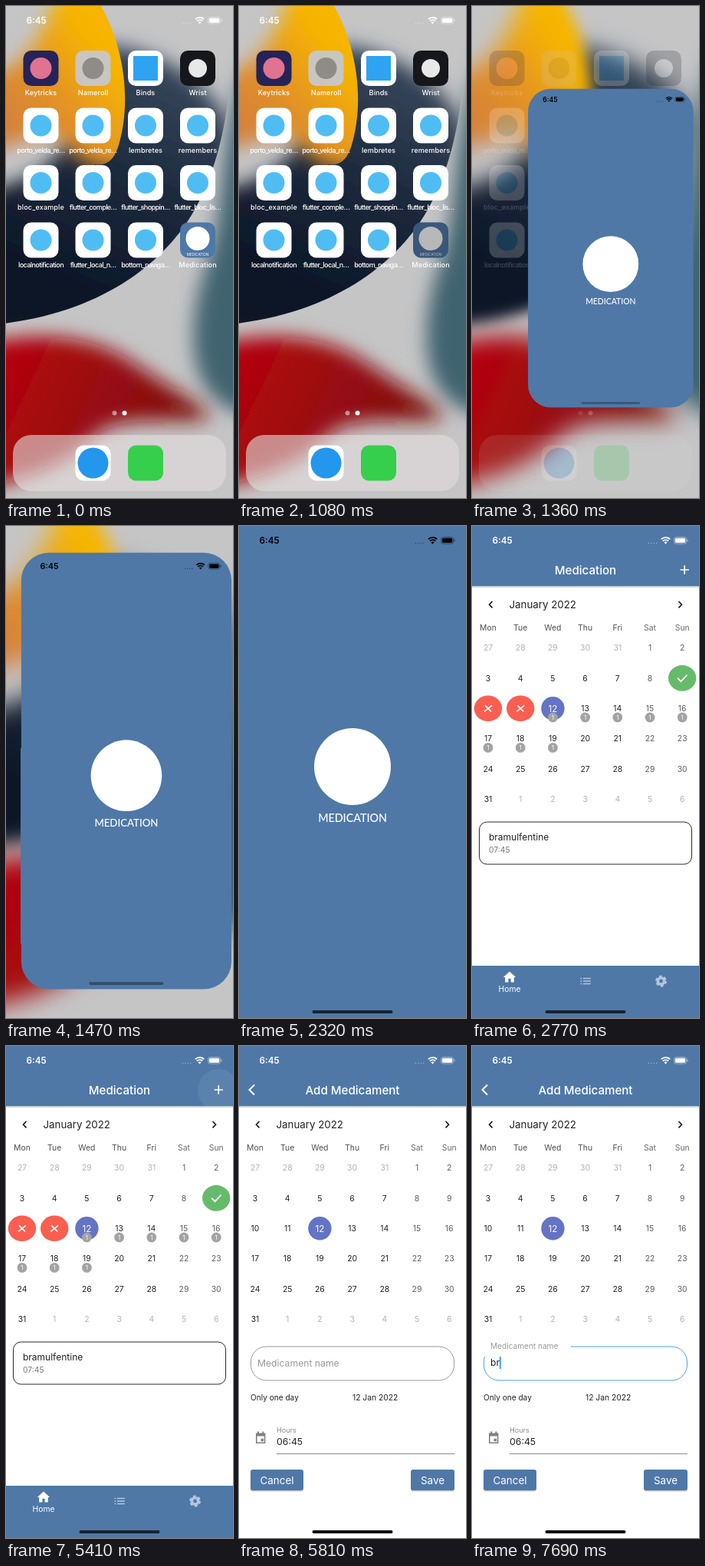
These frames come from a looping animation (296 px wide and 640 px high, 8000 ms). An HTML page:

```html
<!DOCTYPE html>
<html lang="en">
<head>
<meta charset="utf-8">
<title>Medication reminder</title>
<style>
  html, body { margin: 0; width: 100%; height: 100%; overflow: hidden; background: #fff; }
  svg { display: block; width: 296px; height: 640px; font-family: Inter, Roboto, sans-serif; }
  .mid { text-anchor: middle; }
</style>
</head>
<body>
<svg id="stage" viewBox="0 0 296 640" xmlns="http://www.w3.org/2000/svg"></svg>
<script>
const LOOP = 8000;
// Moments at which the picture is refreshed
const TICKS = [0, 1080, 1250, 1360, 1470, 1570, 1680, 2320, 2450, 2560, 2660, 2770,
  5410, 5580, 5695, 5810, 6790, 6890, 7360, 7470, 7580, 7690];
const BLUE = '#4f78a7';

const text = (x, y, size, fill, str, extra = '') =>
  `<text x="${x}" y="${y}" font-size="${size}" fill="${fill}" ${extra}>${str}</text>`;
const mid = (x, y, size, fill, str, extra = '') => text(x, y, size, fill, str, 'class="mid" ' + extra);
const rect = (x, y, w, h, fill, r = 0, extra = '') =>
  `<rect x="${x}" y="${y}" width="${w}" height="${h}" rx="${r}" fill="${fill}" ${extra}/>`;
const disc = (x, y, r, fill, extra = '') => `<circle cx="${x}" cy="${y}" r="${r}" fill="${fill}" ${extra}/>`;
const line = (d, color, w, extra = '') =>
  `<path d="${d}" fill="none" stroke="${color}" stroke-width="${w}" ${extra}/>`;

function statusBar(color) {
  let s = text(26.5, 23, 11.7, color, '6:45', 'font-weight="600"');
  for (let i = 0; i < 4; i++) s += disc(230.5 + i * 3.4, 22.3, 0.8, color, 'opacity=".4"');
  s += line('M246.8 17.2a8.2 8.2 0 0 1 11.4 0M248.9 19.5a5.2 5.2 0 0 1 7.2 0', color, 1.8);
  s += `<path d="M252.5 23.4l-2-2.1a2.9 2.9 0 0 1 4 0z" fill="${color}"/>`;
  s += rect(263.5, 14.5, 16, 8.6, 'none', 2.6, `stroke="${color}" stroke-opacity=".4"`);
  s += rect(264.8, 15.8, 13.4, 6, color, 1.5);
  return s + rect(280.4, 17.2, 1.2, 3.2, color, 0.6, 'opacity=".5"');
}

function wallpaper() {
  return `<defs>
    <filter id="soft" x="-40%" y="-40%" width="180%" height="180%"><feGaussianBlur stdDeviation="12"/></filter>
    <linearGradient id="sun" x1=".15" y1=".9" x2=".75" y2=".35"><stop stop-color="#cf7a45"/><stop offset=".5" stop-color="#e08f28"/><stop offset=".95" stop-color="#f7b500"/></linearGradient>
    <linearGradient id="night" x1=".3" y1="1" x2=".7" y2="0"><stop offset=".2" stop-color="#0b1626"/><stop offset=".6" stop-color="#1d2a3d"/><stop offset="1" stop-color="#3a4a5e"/></linearGradient>
    <linearGradient id="ruby" x2="1" y2=".3"><stop offset=".2" stop-color="#b4040f"/><stop offset=".65" stop-color="#960c12"/><stop offset="1" stop-color="#7d1410"/></linearGradient>
    <clipPath id="nightEdge"><path d="M-60 417C110 414 205 338 246 265C272 218 288 160 292 90V-20H-60Z"/></clipPath>
    <clipPath id="sunEdge"><path d="M-80-60H95L124 0C157 60 163 130 146 184Q137 210 116 206L90 250H-80Z"/></clipPath>
  </defs>
  ${rect(-80, -80, 456, 800, '#c5c5c6')}
  <path filter="url(#soft)" fill="#3f6470"
    d="M340 40C278 100 290 240 266 325C238 395 238 465 262 498C280 522 300 532 340 536Z"/>
  <g clip-path="url(#nightEdge)"><path filter="url(#soft)" fill="url(#night)"
    d="M-60 242C30 236 90 215 130 50C190 55 260 90 288 150C310 220 290 340 150 450H-60Z"/></g>
  <g clip-path="url(#sunEdge)"><path filter="url(#soft)" fill="url(#sun)"
    d="M80-60H170L180 190C155 225 100 215 78 178C50 155 10 185-60 200V98C20 92 52 50 80-60Z"/></g>
  <path filter="url(#soft)" fill="url(#ruby)"
    d="M-60 448C40 415 120 430 172 468C215 498 255 516 266 536C230 546 165 530 125 552C95 575 75 610-60 632Z"/>`;
}

const COLS = [45.5, 113.5, 182, 250];
const tile = (x, y, fill) => rect(x - 23, y - 23, 46, 46, fill, 10.5);

function homeIcons() {
  const labels = ['Keytricks', 'Nameroll', 'Binds', 'Wrist',
    'porto_velda_re…', 'porto_velda_re…', 'lembretes', 'remembers',
    'bloc_example', 'flutter_comple…', 'flutter_shoppin…', 'flutter_bloc_lis…',
    'localnotification', 'flutter_local_n…', 'bottom_naviga…', 'Medication'];
  const tiles = { 0: '#25235a', 1: '#c9c6c1', 3: '#15171a', 15: BLUE };
  let s = '';
  labels.forEach((label, i) => {
    const x = COLS[i % 4], y = 81 + 74.5 * (i >> 2);
    s += tile(x, y, tiles[i] || '#fff');
    if (i === 0) s += disc(x, y, 14, '#e0738f');
    else if (i === 1) s += disc(x, y, 14, '#8f8c88');
    else if (i === 2) s += rect(x - 16, y - 16, 32, 32, '#2ea3f2');
    else if (i === 3) s += disc(x, y, 12, '#e8e8e8');
    else if (i < 15) s += disc(x, y, 14, '#4fbdf3');
    else s += disc(x, y - 2, 15.5, '#fff') + mid(x, y + 20, 4.6, '#fff', 'MEDICATION');
    const tight = label.length > 13 ? -0.62 : 0.1;
    s += mid(x, y + 35, 9.1, '#fff', label, `font-weight="500" letter-spacing="${tight}"`);
  });
  s += disc(141.5, 529.5, 3, '#fff', 'opacity=".5"') + disc(154.5, 529.5, 3, '#fff');
  s += rect(9, 558, 278, 73, '#e4dede', 24, 'opacity=".6"');
  s += tile(113.5, 594.5, '#fff') + disc(113.5, 594.5, 20, '#2396ee');
  return s + tile(182, 594.5, '#35cf4c');
}

function calendar(marked) {
  const mark = (x, y, fill, d) =>
    `<ellipse cx="${x}" cy="${y}" rx="18.2" ry="16.8" fill="${fill}"/>` + line(d, '#fff', 1.7);
  let s = line('M26.5 98l-4 4.2l4 4.2M269.5 98l4 4.2l-4 4.2', '#111', 1.6);
  s += text(48.5, 107, 13.3, '#222', 'January 2022');
  ['Mon', 'Tue', 'Wed', 'Thu', 'Fri', 'Sat', 'Sun'].forEach((name, i) => {
    s += mid(21 + 42.2 * i, 136, 10.4, i > 4 ? '#6a6a6a' : '#4f4f4f', name);
  });
  for (let i = 0; i < 42; i++) {
    const x = 21 + 42.2 * (i % 7), y = 158.5 + 39.4 * Math.floor(i / 7);
    const n = i - 4, out = n < 1 || n > 31;
    const day = n < 1 ? n + 31 : n > 31 ? n - 31 : n;
    if (marked && n === 9) s += mark(x, y, '#66bb6a', `M${x - 6} ${y}l4.3 4.3l8-8.6`);
    else if (marked && (n === 10 || n === 11)) s += mark(x, y, '#f95f51', `M${x - 4} ${y - 4}l8 8m1-8l-10 8`);
    else {
      const today = n === 12;
      if (today) s += disc(x, y, 15.2, '#6473c4');
      const fill = today ? '#fff' : out ? '#b2b2b2' : i % 7 > 4 ? '#5f5f5f' : '#222';
      s += mid(x, y + (today ? 4.2 : 3.7), today ? 11.6 : 10.4, fill, day);
    }
    if (marked && n > 11 && n < 20)
      s += disc(x, y + 11.7, 6.4, '#a3a3a3') + mid(x, y + 14.6, 8, '#fff', '1');
  }
  return s;
}

const appBar = title => rect(0, 0, 296, 81, 'url(#shade)') + rect(0, 0, 296, 78, BLUE) +
  mid(148, 62.5, 15.1, '#fff', title, 'font-weight="500"');

function listPage() {
  let s = rect(0, 0, 296, 640, '#fff') + appBar('Medication');
  s += `<g clip-path="url(#bar)">${disc(277, 57, 27, '#fff', 'id="ink"')}</g>`;
  s += line('M271.5 57h11.4M277.2 51.3v11.4', '#fff', 1.7) + calendar(true);
  s += rect(9.5, 385, 277, 55, '#fff', 10, 'stroke="#2a2a2a"');
  s += text(22, 409, 12, '#222', 'bramulfentine') + text(22, 424.5, 10.3, '#777', '07:45');
  s += rect(0, 572, 296, 68, BLUE);
  s += '<path d="M49 579.6l-8.2 7.4h2.4v6.4h4.2v-4.6h3.2v4.6h4.2v-6.4h2.4z" fill="#fff"/>';
  s += mid(49, 605.5, 10.3, '#fff', 'Home');
  s += line('M141.5 588.5h1.8m1.7 0h9.8M141.5 592h1.8m1.7 0h9.8M141.5 595.5h1.8m1.7 0h9.8', '#b3c6dc', 1.5);
  s += `<circle cx="246.5" cy="592" r="4.2" fill="none" stroke="#b3c6dc" stroke-width="3.6"/>`;
  return s + `<circle cx="246.5" cy="592" r="6.3" fill="none" stroke="#b3c6dc" stroke-width="2.4" stroke-dasharray="3.6 3"/>`;
}

function addPage() {
  const button = (x, w, label) => rect(x, 552.5, w, 27, '#000', 3, 'opacity=".22"') +
    rect(x, 551, w, 27, BLUE, 3) + mid(x + w / 2, 569.5, 13.4, '#fff', label);
  let s = rect(0, 0, 296, 640, '#fff') + appBar('Add Medicament');
  s += line('M20 50.5l-6.5 6.5l6.5 6.5', '#fff', 2) + calendar(false);
  s += line('', '#999', 1, 'id="border"') + text(24, 417, 12.2, '#999', 'Medicament name', 'id="label"');
  s += text(24, 416, 12.2, '#222', '', 'id="typed"') + rect(24, 404, 1.6, 16, '#2196f3', 0, 'id="caret"');
  s += text(15, 460.5, 10.1, '#222', 'Only one day') + text(148, 460.5, 10.3, '#222', '12 Jan 2022');
  s += '<path fill="#808080" fill-rule="evenodd" d="M22 503.5h2v-2h2v2h4.4v-2h2v2h2v13.4H22zM23.6 507.6v7.8h9.2v-7.8zM28.5 510.8h3.4v3.4h-3.4z"/>';
  s += text(49, 502.5, 9.1, '#888', 'Hours') + text(49, 519, 12.3, '#222', '06:45');
  s += rect(49, 530, 232, 1, '#8c8c8c');
  return s + button(15, 69, 'Cancel') + button(224, 57, 'Save');
}

document.getElementById('stage').innerHTML = `
  <defs>
    <linearGradient id="shade" x2="0" y2="1"><stop offset=".95" stop-color="#8aa" /><stop offset="1" stop-color="#fff"/></linearGradient>
    <clipPath id="bar">${rect(0, 0, 296, 78, '#000')}</clipPath>
    <clipPath id="cardClip"><rect id="cardRect"/></clipPath>
  </defs>
  <g id="wall">${wallpaper()}</g>
  <g id="icons">${homeIcons()}</g>
  ${rect(227, 281.5, 46, 46, '#000', 10.5, 'id="press" opacity=".28"')}
  <g id="homeBar">${statusBar('#fff')}</g>
  <g id="card" clip-path="url(#cardClip)">
    ${rect(0, 0, 296, 640, BLUE)}
    <g id="splash">
      ${disc(148, 313, 50, '#fff')}
      ${mid(148, 385, 14.3, '#fff', 'MEDICATION', 'font-weight="500" style="font-family:Lato,sans-serif"')}
      ${statusBar('#000')}
    </g>
    ${rect(95.5, 630, 105, 4, '#000', 2, 'id="cardGrip"')}
  </g>
  <g id="app">
    <g id="list">${listPage()}</g>
    <g id="add">${addPage()}</g>
    ${statusBar('#fff')}
    ${rect(95.5, 630, 105, 4, '#000', 2, 'id="grip"')}
  </g>`;

const el = {};
document.querySelectorAll('#stage [id]').forEach(n => el[n.id] = n);
const set = (id, attrs) => { for (const k in attrs) el[id].setAttribute(k, attrs[k]); };
const show = (id, on) => set(id, { visibility: on ? 'visible' : 'hidden' });
const ramp = (t, a, b) => Math.min(1, Math.max(0, (t - a) / (b - a)));
const mix = (a, b, p) => a + (b - a) * p;
const spring = (t, k) => t <= 0 ? 0 : 1 - (1 + k * t) * Math.exp(-k * t);

function openCard(t) {
  const done = t >= 1680;
  const p = done ? 1 : spring(t - 1210, 0.0156), q = done ? 1 : spring(t - 1210, 0.014);
  const w = mix(46, 296, p), h = mix(46, 640, q), scale = w / 296;
  const x = mix(250, 148, p) - w / 2, y = mix(304.5, 320, p) - h / 2;
  set('cardRect', { x, y, width: w, height: h, rx: done ? 0 : mix(10.5, 36, Math.min(1, p * 1.1)) });
  set('splash', { transform: `translate(${x} ${y}) scale(${scale})` });
  set('cardGrip', { transform: `translate(${x} ${y + h - 640 * scale}) scale(${scale})`, opacity: done ? 0.7 : 0.4 * p });
  set('card', { opacity: ramp(p, 0, 0.3) });
  set('icons', { opacity: 1 - ramp(p, 0, 0.85) });
  set('homeBar', { opacity: 1 - ramp(p, 0, 0.5) });
  el.wall.style.filter = p > 0 && !done ? `blur(${13 * p}px)` : 'none';
  show('card', p > 0);
  show('press', t >= 1080 && p < 0.3);
}

function drawField(t) {
  const f = ramp(t, 6690, 6890) * (t >= 6790);
  const left = f ? 'q0-4 1-7' : 'a20 20 0 0 1 20-20z';
  set('border', {
    d: `M${mix(35.5, 129, f)} 391H260.5a20 20 0 0 1 20 20v4a20 20 0 0 1-20 20H35.5a20 20 0 0 1-20-20v-4${left}`,
    stroke: f ? '#4ba3e3' : '#999'
  });
  set('label', { y: mix(417, 394, f), 'font-size': mix(12.2, 10.1, f) });
  const typed = 'br'.slice(0, (t >= 7580) + (t >= 7690));
  el.typed.textContent = typed;
  const blink = typed ? 1 : 1 - ramp(t, 7290, 7430);
  set('caret', { x: [24, 31.6, 36][typed.length], opacity: f ? blink : 0 });
}

function draw(now) {
  const time = now % LOOP;
  const t = TICKS.filter(k => k <= time).pop();
  openCard(t);
  const fade = ramp(t, 2390, 2770);
  set('app', { opacity: fade });
  show('app', fade > 0);
  set('ink', { opacity: t >= 5410 ? 0.07 : 0 });
  const slide = 1 - Math.pow(1 - ramp(t, 5490, 5810), 2.8);
  set('list', { transform: `translate(${-99 * slide} 0)` });
  set('add', { transform: `translate(${296 * (1 - slide)} 0)` });
  set('grip', { opacity: mix(0.7, 0.95, slide) });
  drawField(t);
}

function loop() {
  draw(performance.now());
  requestAnimationFrame(loop);
}
loop();
</script>
</body>
</html>
```
